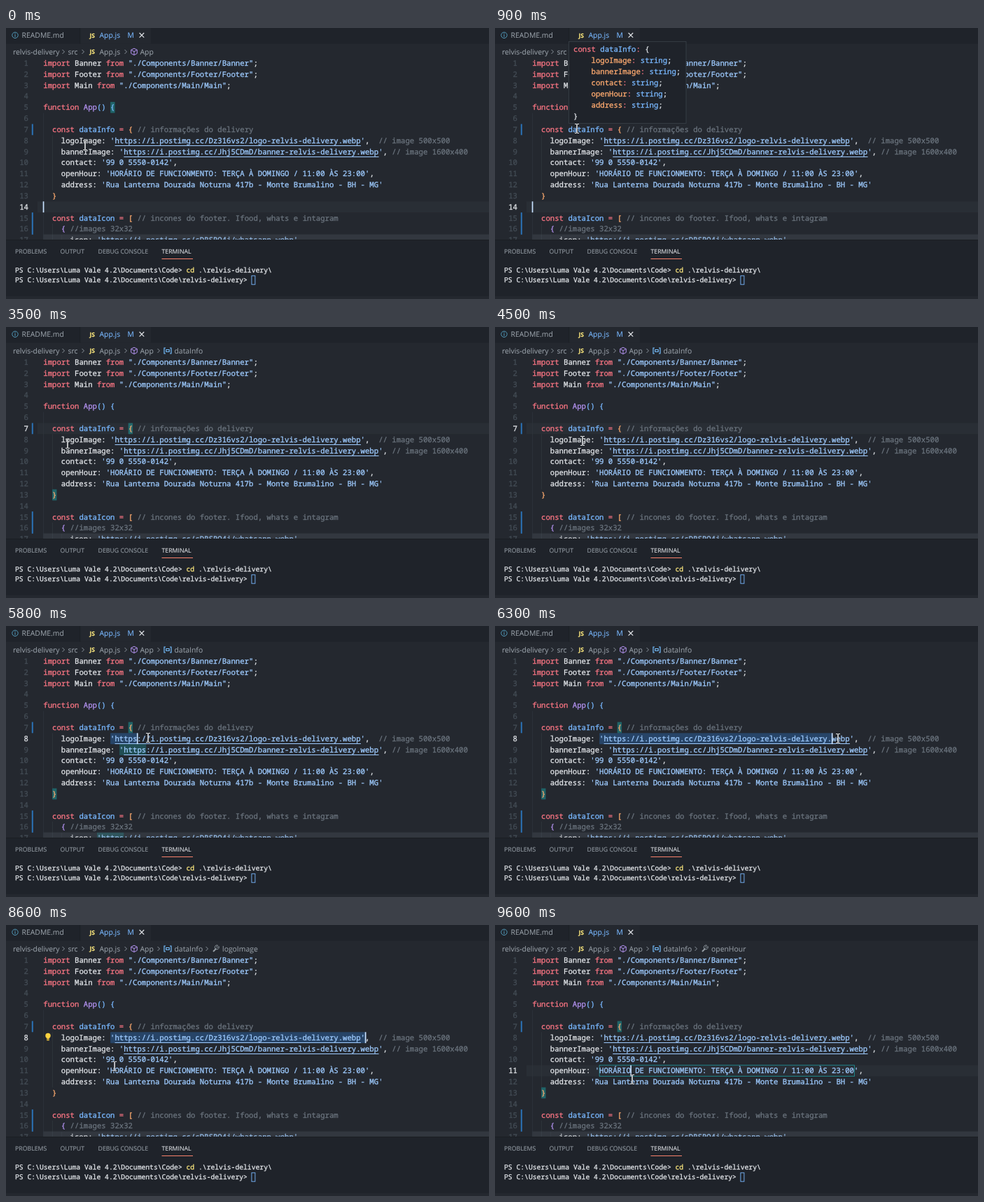
Write an HTML page that moves like this. It is 690x388 px and loops after 9.7 s.

```html
<!DOCTYPE html>
<html lang="pt-BR">
<head>
<meta charset="utf-8">
<title>Code editor</title>
<style>
  html, body { margin: 0; width: 100%; height: 100%; overflow: hidden; background: #24282f; }
  svg { display: block; width: 690px; height: 388px; }
  text { white-space: pre; text-rendering: geometricPrecision; stroke-width: 0.1px; }
  .code, .term { stroke-width: 0.3px; }
  .code { font: 10.65px "Noto Sans Mono", "DejaVu Sans Mono", monospace; }
  .term { font: 9.71px "Noto Sans Mono", "DejaVu Sans Mono", monospace; }
  .ui { font: 10.4px "Open Sans", "Noto Sans", sans-serif; }
  .panel { font: 8.75px "Open Sans", "Noto Sans", sans-serif; }
  .badge { font: bold 8.6px "Open Sans", "Noto Sans", sans-serif; }
</style>
</head>
<body>
<svg id="stage" viewBox="0 0 690 388"></svg>
<script>
const LOOP = 9700, TICK = 100;
const LEFT = 53.3, CHAR = 6.39, TOP = 42.5, ROW = 15.83;
const SURFACE = '#24282f', SIDE = '#1f232a', EDGE = '#1b1e23';
const COLOR = {
  t: '#e1e4e8', k: '#f97583', s: '#9ecbff', c: '#6a737d', v: '#79b8ff',
  f: '#b392f0', o: '#ffab70', dim: '#959da5', num: '#444d56', y: '#ffea7f'
};
const stage = document.getElementById('stage');
const colX = col => LEFT + col * CHAR;
const rowY = row => TOP + (row - 1) * ROW;

function add(tag, attrs, parent = stage) {
  const el = document.createElementNS('http://www.w3.org/2000/svg', tag);
  for (const name in attrs) el.setAttribute(name, attrs[name]);
  parent.appendChild(el);
  return el;
}
const group = (parent = stage) => add('g', {}, parent);
const rect = (x, y, width, height, fill, parent) =>
  add('rect', { x, y, width, height, fill }, parent);
const stroke = (d, color, width = 1, parent) =>
  add('path', { d, fill: 'none', stroke: color, 'stroke-width': width }, parent);

function ink(el, color) {
  el.setAttribute('fill', color);
  el.setAttribute('stroke', color);
}

// Tokens alternate: colour key, text.
function write(x, y, cls, tokens, parent) {
  const el = add('text', { x, y, class: cls }, parent);
  for (let i = 0; i < tokens.length; i += 2) {
    const span = add('tspan', {}, el);
    ink(span, COLOR[tokens[i]]);
    span.textContent = tokens[i + 1];
  }
  return el;
}
const show = (el, on) => el.setAttribute('visibility', on ? 'visible' : 'hidden');

const importLine = name =>
  ['k', 'import ', 't', name + ' ', 'k', 'from ', 's', `"./Components/${name}/${name}"`, 't', ';'];
const field = (name, value, tail = ',', note = '') =>
  ['t', `    ${name}: `, 's', `'${value}'`, 't', tail, 'c', note];
const HOST = 'https://i.postimg.cc/';
const LOGO = HOST + 'Dz316vs2/logo-relvis-delivery.webp';
const BANNER = HOST + 'Jhj5CDmD/banner-relvis-delivery.webp';
const ICON = HOST + 'sDRSRQ4j/whatsapp.webp';

const lines = [
  importLine('Banner'),
  importLine('Footer'),
  importLine('Main'),
  [],
  ['k', 'function ', 'f', 'App', 'v', '() {'],
  [],
  ['k', '  const ', 'v', 'dataInfo ', 'k', '= ', 'o', '{ ', 'c', '// informações do delivery'],
  field('logoImage', LOGO, ',  ', '// image 500x500'),
  field('bannerImage', BANNER, ', ', '// image 1600x400'),
  field('contact', '99 0 5550-0142'),
  field('openHour', 'HORÁRIO DE FUNCIONMENTO: TERÇA À DOMINGO / 11:00 ÀS 23:00'),
  field('address', 'Rua Lanterna Dourada Noturna 417b - Monte Brumalino - BH - MG', ''),
  ['o', '  }'],
  [],
  ['k', '  const ', 'v', 'dataIcon ', 'k', '= ', 'o', '[ ', 'c', '// incones do footer. Ifood, whats e intagram'],
  ['f', '    { ', 'c', '//images 32x32'],
  ['t', '      icon: ', 's', `'${ICON}'`]
];

// Editor surface
rect(0, 0, 690, 388, SURFACE);
const activeLine = rect(45, 0, 645, ROW, '#292e35');
for (const [col, from, to] of [[0, 6, 18], [2, 8, 13], [2, 16, 18], [4, 17, 18]]) {
  rect(colX(col), rowY(from), 0.8, (to - from) * ROW, '#2f363d');
}
for (const [row, count] of [[7, 1], [15, 2]]) rect(36.8, rowY(row), 2, count * ROW, '#2b72b5');

// Highlights behind the text
const highlights = group();
function cells(row, col, count, fill) {
  return rect(colX(col), rowY(row), count * CHAR, ROW, fill, highlights);
}
const outerBracket = cells(5, 15, 1, '#17e5e650');
const innerBrackets = [cells(7, 19, 1, '#17e5e650'), cells(13, 2, 1, '#17e5e650')];
const selection = cells(8, 15, 1, '#3392ff44');
const matches = [cells(9, 17, 1, '#17e5e633'), cells(17, 12, 1, '#17e5e633')];
const valueBox = cells(11, 15, 57, 'none');
valueBox.setAttribute('stroke', '#17e5e699');
valueBox.setAttribute('stroke-width', 0.8);

const numbers = lines.map((tokens, i) => {
  const y = rowY(i + 1) + 11.5;
  if (tokens.length) write(LEFT, y, 'code', tokens);
  const number = write(32, y, 'code', ['num', String(i + 1)]);
  number.setAttribute('text-anchor', 'end');
  return number.firstChild;
});
for (const [row, col, url] of [[8, 16, LOGO], [9, 18, BANNER], [17, 13, ICON]]) {
  rect(colX(col), Math.round(rowY(row) + 14.4), url.length * CHAR, 1, COLOR.s);
}
rect(53.5, 295.5, 636.5, 7.5, '#6a737d33');

const bulb = group();
add('circle', { cx: 60, cy: 158.4, r: 3.7, fill: '#ffd23f' }, bulb);
rect(58.2, 161.5, 3.6, 3.8, '#ffd23f', bulb);
rect(58.2, 163, 3.6, 0.7, SURFACE, bulb);

const caret = rect(0, 0, 1.7, ROW, '#c8e1ff');

// Tabs
rect(0, 0, 690, 22.5, SIDE);
rect(106, 0, 101, 22.5, SURFACE);
rect(105.4, 0, 0.8, 22.5, EDGE);
add('circle', { cx: 13, cy: 10.3, r: 4.2, fill: 'none', stroke: '#519aba' });
stroke('M13 9.6V12.8M13 7.6V8.7', '#519aba', 1.1);
write(22.6, 14.3, 'ui', ['dim', 'README.md']);
write(119.5, 13.7, 'badge', ['y', 'JS']);
write(133.5, 14.3, 'ui', ['v', 'App.js']);
write(173.5, 14.3, 'ui', ['v', 'M']);
stroke('M190.6 7l6.6 6.6M197.2 7l-6.6 6.6', COLOR.t, 1.2);

// Breadcrumbs
const chevron = (x, parent) => stroke(`M${x - 1.5} 31l3 3-3 3`, COLOR.dim, 0.9, parent);
const crumb = (x, label, parent) => write(x, 37.6, 'ui', ['dim', label], parent);
crumb(10, 'relvis-delivery');
chevron(82);
crumb(88.5, 'src');
chevron(110);
write(119.5, 37.2, 'badge', ['y', 'JS']);
crumb(133.5, 'App.js');
chevron(171);
stroke('M183 29.2l4.3 2.2v5l-4.3 2.4-4.3-2.4v-5zM178.7 31.4l4.3 2.3 4.3-2.3M183 33.7v5', COLOR.f, 1);
crumb(191.5, 'App');
const infoCrumb = group();
chevron(218, infoCrumb);
stroke('M228 30h-2v8h2M234 30h2v8h-2M228.8 32.5h4.4v3h-4.4z', '#75beff', 1.2, infoCrumb);
crumb(240.5, 'dataInfo', infoCrumb);

function fieldCrumb(name) {
  const g = group();
  chevron(287, g);
  stroke('M296 38l4.4-4.4', COLOR.dim, 2, g);
  stroke('M304 30.6l-2 2-1.4-1.4 2-2a3 3 0 1 0 1.4 1.4z', COLOR.dim, 0.9, g);
  crumb(309, name, g);
  return g;
}
const logoCrumb = fieldCrumb('logoImage');
const hourCrumb = fieldCrumb('openHour');

// Terminal panel
rect(0, 303, 690, 85, SIDE);
rect(0, 303, 690, 0.9, EDGE);
rect(0, 384, 690, 4, SURFACE);
[[13, 'PROBLEMS'], [77.5, 'OUTPUT'], [131.5, 'DEBUG CONSOLE'], [222.5, 'TERMINAL']].forEach(([x, label], i) =>
  write(x, 322.6, 'panel', [i === 3 ? 't' : 'dim', label]));
rect(222.5, 330, 44.5, 1, '#f9826c');
const prompt = 'PS C:\\Users\\Luma Vale 4.2\\Documents\\Code';
write(13, 350, 'term', ['t', prompt + '> ', 'y', 'cd ', 't', '.\\relvis-delivery\\']);
write(13, 364.2, 'term', ['t', prompt + '\\relvis-delivery>']);
add('rect', { x: 350.9, y: 354.8, width: 5, height: 12.4, fill: 'none', stroke: COLOR.v, 'stroke-width': 0.9 });

// Hover card
const card = group();
add('rect', { x: 105.5, y: 19.5, width: 167.5, height: 117, fill: SIDE, stroke: '#3a4149', 'stroke-width': 0.8 }, card);
const cardLines = [
  ['k', 'const ', 'v', 'dataInfo', 'k', ':', 't', ' {'],
  ...['logoImage', 'bannerImage', 'contact', 'openHour', 'address'].map(name =>
    ['o', '    ' + name, 'k', ': ', 'v', 'string', 't', ';']),
  ['t', '}']
];
cardLines.forEach((tokens, i) => write(112, 34.3 + i * 15.87, 'code', tokens, card));

const pointer = group();
const beam = 'M-3 -6.5H-1Q0 -6.5 0 -5.5V5.5Q0 6.5 -1 6.5H-3M3 -6.5H1Q0 -6.5 0 -5.5V5.5Q0 6.5 1 6.5H3';
stroke(beam, EDGE, 2, pointer);
stroke(beam, '#f0f2f4', 1, pointer);

// Motion tables: time, then values
const pointerPath = [
  [100, 113, 168], [400, 117, 144], [1100, 117, 144], [1500, 181, 145], [1800, 181, 145],
  [2000, 222, 150], [2200, 215, 155], [2600, 86, 173], [3100, 88, 167], [3500, 88, 167],
  [3900, 97, 220], [4400, 124, 164], [4500, 125, 163], [5000, 150, 161], [5500, 150, 161],
  [5800, 203, 160], [6000, 285, 160], [6300, 490, 161], [6400, 516, 161], [7100, 516, 161],
  [7500, 254, 187], [8100, 126, 196], [8300, 126, 197], [9000, 194, 209], [9200, 194, 209],
  [9500, 196, 221]
];
const selectionEnd = [[5500, 15], [5600, 16], [5800, 21], [6000, 34], [6300, 67], [6400, 72]];
// start, row, column
const caretStops = [[-400, 14, 0], [1600, 7, 20], [5100, 8, 15], [6400, 8, 72], [9100, 11, 22]];

function along(table, t) {
  const next = table.findIndex(step => step[0] > t);
  if (next === 0) return table[0].slice(1);
  if (next < 0) return table[table.length - 1].slice(1);
  const a = table[next - 1], b = table[next];
  const p = (t - a[0]) / (b[0] - a[0]);
  return a.slice(1).map((v, i) => v + (b[i + 1] - v) * p);
}

function render(t) {
  const within = (from, to) => t >= from && t < to;
  const [x, y] = along(pointerPath, t);
  pointer.setAttribute('transform', `translate(${x} ${y})`);

  const [start, row, stopCol] = caretStops.filter(stop => stop[0] <= t).pop();
  const dragging = within(5500, 6400);
  const end = Math.round(along(selectionEnd, t)[0]);
  const col = dragging ? end : stopCol;
  caret.setAttribute('x', colX(col) - 0.6);
  caret.setAttribute('y', rowY(row));
  show(caret, dragging || (t - start - 100) % 1000 < 500);
  numbers.forEach((n, i) => ink(n, i + 1 === row ? COLOR.t : COLOR.num));

  const length = end - 15;
  const selecting = within(5500, 9100) && length > 0;
  selection.setAttribute('width', length * CHAR);
  show(selection, selecting);
  activeLine.setAttribute('y', rowY(row));
  show(activeLine, !selecting);
  for (const match of matches) {
    match.setAttribute('width', length * CHAR);
    show(match, dragging && length > 0 && length <= HOST.length + 1);
  }

  show(outerBracket, t < 1900);
  for (const b of innerBrackets) show(b, within(1900, 3700) || within(5200, 6400) || t >= 9100);
  show(valueBox, t >= 9400);
  show(bulb, within(6600, 9100));
  show(card, within(600, 1300));
  show(infoCrumb, t >= 1700);
  show(logoCrumb, within(6600, 9300));
  show(hourCrumb, t >= 9300);
}

const origin = performance.now();
function frame() {
  const t = (performance.now() - origin) % LOOP;
  render(Math.floor(t / TICK) * TICK);
  requestAnimationFrame(frame);
}
frame();
</script>
</body>
</html>
```
